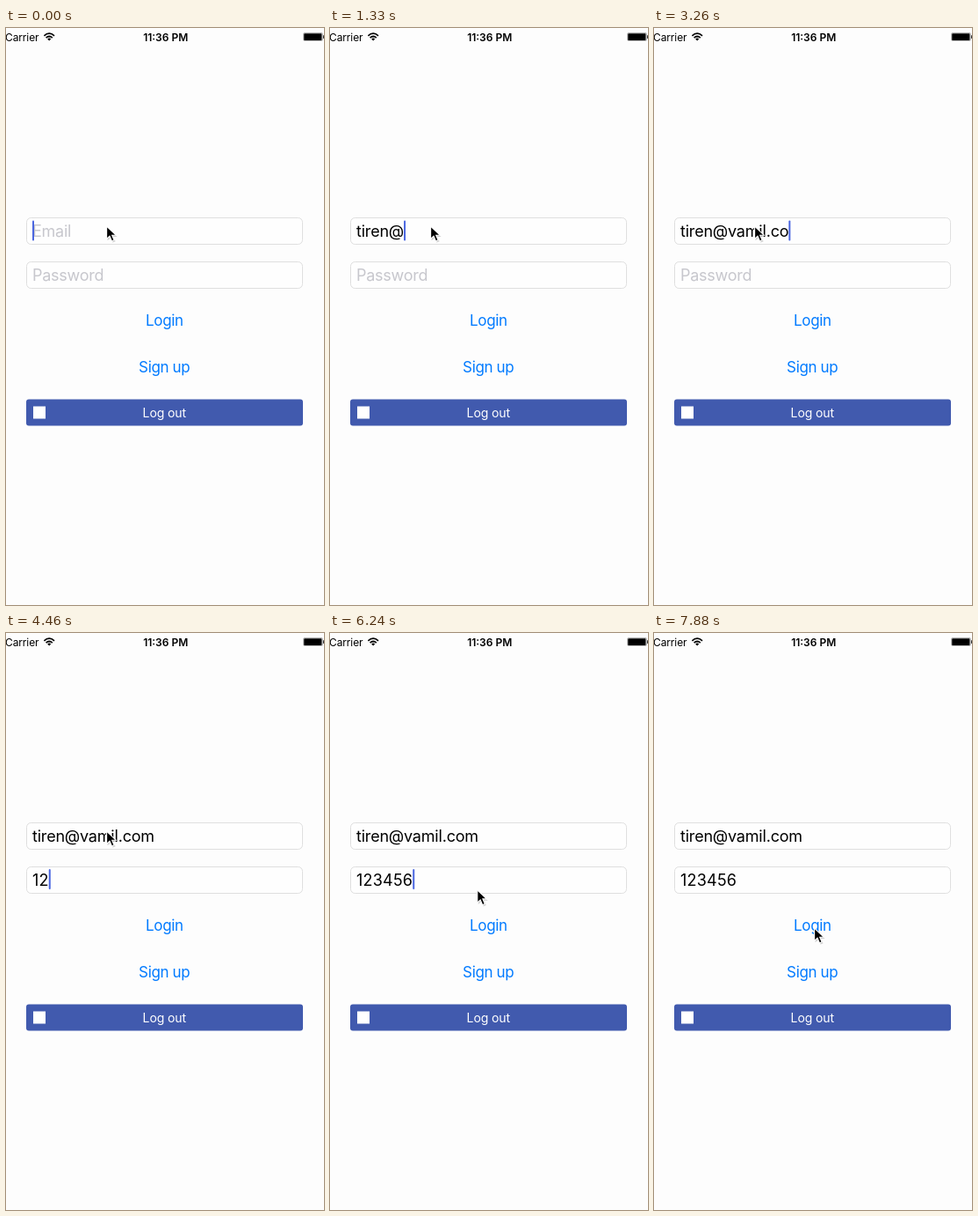
Recreate the animation shown at these times as an HTML page. Size 362 px wide and 655 px high, loop 8 s.

```html
<!DOCTYPE html>
<html lang="en">
<head>
<meta charset="utf-8">
<title>Login form</title>
<style>
  html, body { margin: 0; width: 100%; height: 100%; overflow: hidden; background: #fdfdfd; }
  svg { display: block; width: 362px; height: 655px; font-family: Inter, Roboto, sans-serif; }
  .field { fill: #fefefe; stroke: #dfdfdf; }
  .input { font-size: 18px; letter-spacing: -.2px; }
  #pass { letter-spacing: .22px; }
  .input.hint { fill: #c7c7cd; letter-spacing: -.25px !important; }
  .link { fill: #007aff; font-size: 17px; letter-spacing: -.36px; text-anchor: middle; }
</style>
</head>
<body>
<svg viewBox="0 0 362 655">
  <rect width="362" height="655" fill="#fdfdfd"/>

  <text x="-1" y="14.5" font-size="12" letter-spacing="-.12">Carrier</text>
  <g fill="none" stroke="#000" stroke-width="1.7">
    <path d="M43.4 8.9Q49.2 3.5 55 8.9"/>
    <path d="M45.6 11.1Q49.2 7.9 52.8 11.1"/>
  </g>
  <path d="M47.2 12.4Q49.2 10.8 51.2 12.4L49.2 14.6Z"/>
  <text x="181.7" y="14.5" font-size="12" font-weight="600" text-anchor="middle">11:36 PM</text>
  <rect x="338.5" y="5.5" width="22" height="9" rx="1.5" fill="none" stroke="#aaa" stroke-width=".8"/>
  <rect x="339.2" y="6.3" width="20.3" height="7.6" rx=".6"/>
  <rect x="361.2" y="8.3" width="1.2" height="3.6"/>

  <rect class="field" x="23.5" y="215.5" width="314" height="30" rx="5"/>
  <rect class="field" x="23.5" y="265.5" width="314" height="30" rx="5"/>
  <text id="email" class="input" x="30" y="236.5"></text>
  <text id="pass" class="input" x="30" y="286.5"></text>
  <rect id="caret" width="2" height="23" rx="1" fill="#4a66e0"/>

  <text class="link" x="180.4" y="338">Login</text>
  <text class="link" x="180.2" y="391">Sign up</text>

  <rect x="23" y="421.5" width="315" height="30" rx="3" fill="#415aae"/>
  <rect x="31" y="429.5" width="14" height="14" fill="#fff"/>
  <text x="180.3" y="441.5" font-size="14" letter-spacing="-.1" fill="#fff" text-anchor="middle">Log out</text>

  <g id="pointer">
    <path d="M1 2V16L4.4 13L7 18.4L10 17L7.4 11.8H12Z" fill="#000" opacity=".18"/>
    <path d="M0 0V14.2L3.4 11L5.9 16.8L8.5 15.6L6.1 10H10.6Z" fill="#000" stroke="#fff" stroke-width="1.1"/>
  </g>
</svg>
<script>
  const LOOP = 8000;
  const TICK = 148.7;   // the screen refreshes once per tick
  const LEAD = 16;
  const FOCUS = 25;     // tick at which the password field takes over
  const PASS_START = 29;
  const MOVE_START = 38;
  const MOVE_TICKS = 7;

  // One token per tick; a dash is a pause.
  const emailKeys = '- - t i r e n - - @ - - - v - - a m - i l. c o - m'.split(' ');
  const passKeys = '1 2 - 3 4 - 56'.split(' ');

  const [email, pass, caret, pointer] =
    ['email', 'pass', 'caret', 'pointer'].map(id => document.getElementById(id));

  const typed = (keys, ticks) =>
    keys.slice(0, Math.max(0, ticks + 1)).filter(k => k !== '-').join('');

  // Shows the value or its hint and returns the caret offset.
  function fill(node, value, hint) {
    node.textContent = value || hint;
    node.classList.toggle('hint', !value);
    return value ? node.getComputedTextLength() : 0;
  }

  // Quick fade out, short dark gap, then solid until the next second.
  function blink(tick) {
    const ms = (tick - MOVE_START - 1) * TICK;
    if (ms < 0) return 1;
    const phase = ms % 1000;
    return phase < 440 ? Math.max(0, .45 - phase / 170) : 1;
  }

  function movePointer(tick) {
    const u = Math.min(1, Math.max(0, (tick - MOVE_START) / MOVE_TICKS));
    const x = 114.6 + 68 * Math.sin(u * Math.PI / 2);
    const y = 225.2 + 110 * u * u * (3 - 2 * u);
    pointer.setAttribute('transform', `translate(${x} ${y})`);
  }

  function draw(t) {
    const tick = Math.floor((t + LEAD) / TICK);
    const emailWidth = fill(email, typed(emailKeys, tick), 'Email');
    const passWidth = fill(pass, typed(passKeys, tick - PASS_START), 'Password');
    const inPass = tick >= FOCUS;
    caret.setAttribute('x', 30 + (inPass ? passWidth : emailWidth));
    caret.setAttribute('y', inPass ? 268 : 218.5);
    caret.setAttribute('opacity', blink(tick));
    movePointer(tick);
  }

  const start = performance.now();
  function run() {
    draw((performance.now() - start) % LOOP);
    requestAnimationFrame(run);
  }
  run();
</script>
</body>
</html>
```
